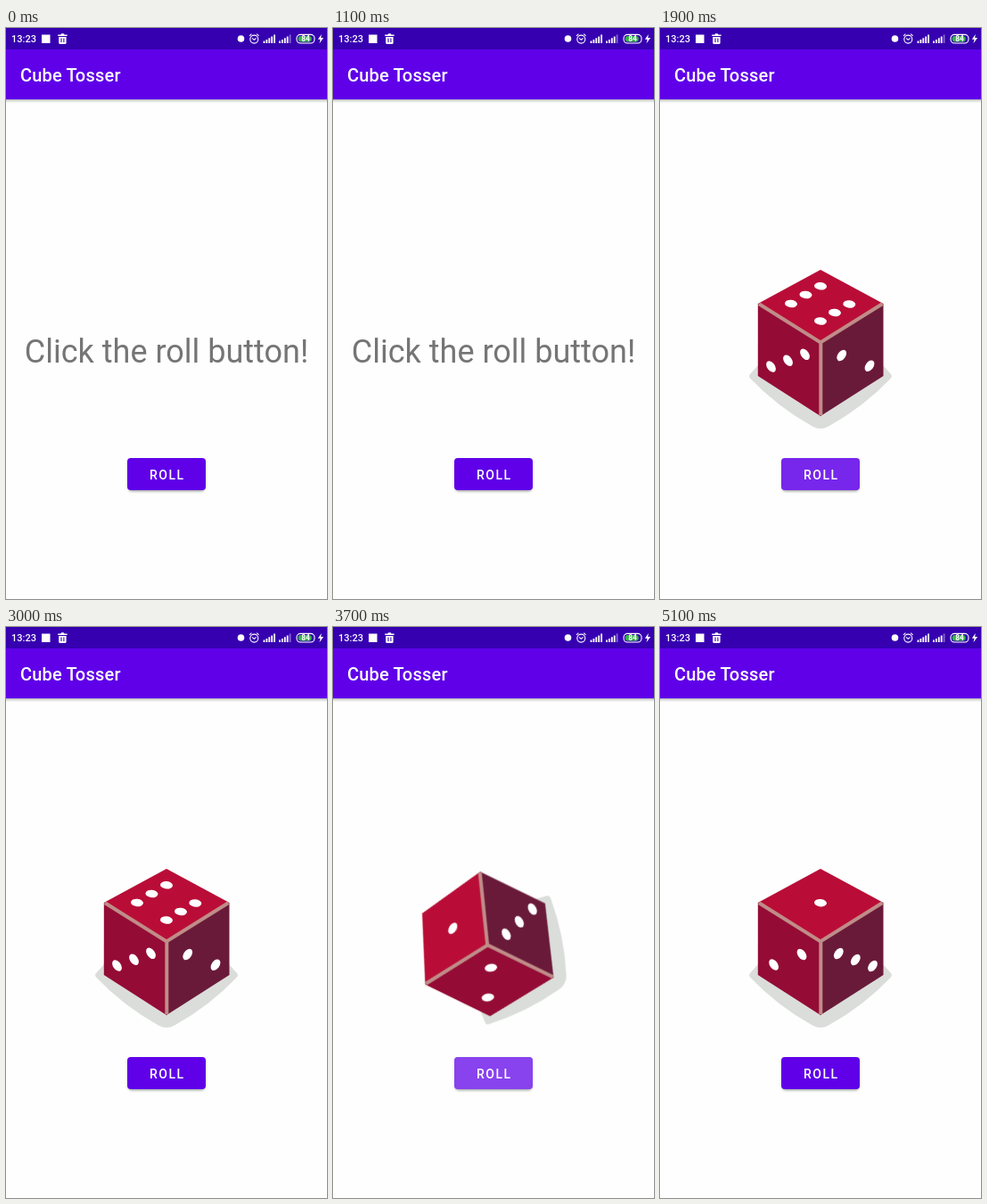
Write an HTML page that moves like this. It is 360 by 640 pixels and loops after 5200 ms.

```html
<!DOCTYPE html>
<html lang="en">
<head>
<meta charset="utf-8">
<title>Cube Tosser</title>
<style>
  html, body { margin: 0; width: 100%; height: 100%; overflow: hidden; background: #fdfefd; }
  svg { display: block; width: 360px; height: 640px; font-family: Roboto, sans-serif; }
  .hint, .dice, .one, .six, .glow, .lift { animation: 5.2s step-end infinite; }
  .hint { animation-name: hint; }
  .dice { animation-name: dice, spin; transform-origin: 180px 360px; }
  .six { animation-name: six; }
  .one { animation-name: one; }
  .glow { animation-name: glow; }
  .lift { animation-name: lift; }

  @keyframes hint { 0% { opacity: 1; } 30.76%, 100% { opacity: 0; } }
  @keyframes dice { 0% { opacity: 0; } 30.76%, 100% { opacity: 1; } }
  @keyframes six { 0% { opacity: 1; } 67.3%, 100% { opacity: 0; } }
  @keyframes one { 0% { opacity: 0; } 67.3%, 100% { opacity: 1; } }

  /* two full turns of 300 ms, seen at ten pictures a second */
  @keyframes spin {
    0% { transform: rotate(0deg); }
    32.69% { transform: rotate(95deg); }
    34.61% { transform: rotate(275deg); }
    36.53% { transform: rotate(360deg); }
    67.3% { transform: rotate(3deg); }
    69.23% { transform: rotate(118deg); }
    71.15% { transform: rotate(296deg); }
    73.07%, 100% { transform: rotate(360deg); }
  }
  @keyframes glow {
    0% { opacity: 0; }
    28.84% { opacity: .15; }
    30.76% { opacity: .36; }
    32.69% { opacity: .37; }
    34.61% { opacity: .27; }
    36.53% { opacity: .15; }
    38.46% { opacity: .06; }
    40.38% { opacity: 0; }
    65.38% { opacity: .15; }
    67.3% { opacity: .36; }
    69.23% { opacity: .36; }
    71.15% { opacity: .26; }
    73.07% { opacity: .14; }
    75% { opacity: .05; }
    76.92%, 100% { opacity: 0; }
  }
  @keyframes lift {
    0% { transform: none; }
    28.84% { transform: translateY(2px); }
    32.69% { transform: none; }
    65.38% { transform: translateY(2px); }
    69.23%, 100% { transform: none; }
  }
</style>
</head>
<body>
<svg viewBox="0 0 360 640">
  <defs>
    <ellipse id="t" rx="7" ry="4.2" transform="rotate(5)"/>
    <ellipse id="l" rx="4.4" ry="7" transform="rotate(-35)"/>
    <ellipse id="r" rx="4.4" ry="7" transform="rotate(35)"/>
    <path id="bars" d="M1 17v-2.5M3.9 17v-4M6.8 17v-5.7M9.7 17v-7.4"/>
    <filter id="soft" x="-20%" y="-50%" width="140%" height="200%">
      <feGaussianBlur stdDeviation="1.4"/>
    </filter>
  </defs>

  <rect width="360" height="640" fill="#fdfefd"/>

  <!-- app bar -->
  <rect x="-8" y="60" width="376" height="21.5" fill="#000" opacity=".3" filter="url(#soft)"/>
  <rect y="24" width="360" height="56" fill="#5f00e9"/>
  <text x="16" y="60" font-size="20" font-weight="500" letter-spacing=".2" fill="#fff">Cube Tosser</text>

  <!-- status bar -->
  <rect width="360" height="24" fill="#3600b1"/>
  <g fill="#fff">
    <text x="6" y="16.3" font-size="11" font-weight="500">13:23</text>
    <rect x="40" y="7.5" width="9.5" height="9.5"/>
    <path d="M58.2 7.5h3l1-1.3h2.4l1 1.3h3v1.6h-10.4z"/>
    <path d="M59.2 10h8.4v6.5q0 1.5-1.5 1.5h-5.4q-1.5 0-1.5-1.5z"/>
    <path d="M62 11.5v4.5M64.9 11.5v4.5" stroke="#3600b1" stroke-width="1.1"/>
    <circle cx="263.5" cy="12" r="3.8"/>
    <path d="M353.8 7l-4 5.7h2.7l-1 4.6 4.6-6.2h-2.9z"/>
  </g>
  <g fill="none" stroke="#fff" stroke-width="1.1">
    <circle cx="278.3" cy="12.6" r="4.5"/>
    <path d="M276 11.3l2.3 2 2.3-2M273 8.8l2.4-2.2M283.6 8.8l-2.4-2.2"/>
    <g stroke-width="1.8">
      <use href="#bars" x="288.5"/>
      <path d="M301.1 17v-9.6"/>
      <use href="#bars" x="306"/>
      <path d="M318.6 17v-9.6" opacity=".4"/>
    </g>
    <rect x="326" y="7.4" width="20" height="9.6" rx="4.2"/>
  </g>
  <rect x="327.7" y="9" width="15" height="6.4" rx="2.8" fill="#35b34a"/>
  <text x="336" y="15.2" font-size="8.4" font-weight="700" text-anchor="middle" fill="#fff">84</text>

  <text class="hint" x="180" y="374.5" font-size="36" text-anchor="middle" fill="#757575">Click the roll button!</text>

  <!-- die -->
  <g class="dice">
    <path d="M110 378L101 388Q99 390.5 101.5 393Q132 425 171 446.5Q180 451.5 189 446.5Q228 425 258.5 393Q261 390.5 259 388L250 378Z" fill="#dbdddb"/>
    <path d="M180 271L250.5 309 180 353 109.8 309Z" fill="#b90d37"/>
    <path d="M109.8 309L180 353V435L109.8 390Z" fill="#940c36"/>
    <path d="M250.5 309L180 353V435L250.5 390Z" fill="#6a1a39"/>
    <path d="M111 309.3L180 352.5 249.3 309.3M180.3 352.5V434" fill="none" stroke="#c08c88" stroke-width="4"/>
    <g class="six" fill="#fff">
      <use href="#t" x="180" y="289.3"/>
      <use href="#t" x="163.5" y="299"/>
      <use href="#t" x="147" y="309"/>
      <use href="#t" x="212.3" y="309.5"/>
      <use href="#t" x="196" y="319"/>
      <use href="#t" x="180" y="328.5"/>
      <use href="#l" x="124.5" y="379.5"/>
      <use href="#l" x="143.5" y="372.7"/>
      <use href="#l" x="162.5" y="365.8"/>
      <use href="#r" x="203.7" y="367"/>
      <use href="#r" x="235" y="378.7"/>
    </g>
    <g class="one" fill="#fff">
      <use href="#t" x="180" y="309.2"/>
      <use href="#l" x="127.6" y="378.5"/>
      <use href="#l" x="159" y="367"/>
      <use href="#r" x="200.3" y="366"/>
      <use href="#r" x="219.3" y="373"/>
      <use href="#r" x="238.5" y="380"/>
    </g>
  </g>

  <!-- button -->
  <g class="lift">
    <rect x="137.2" y="484" width="85.6" height="35.3" rx="4" fill="#000" opacity=".4" filter="url(#soft)"/>
  </g>
  <rect x="136" y="482" width="88" height="36" rx="4" fill="#5f00e9"/>
  <rect class="glow" x="136" y="482" width="88" height="36" rx="4" fill="#fff"/>
  <text x="161" y="505.7" font-size="14" font-weight="500" letter-spacing="1.5" fill="#fff">ROLL</text>
</svg>
</body>
</html>
```
